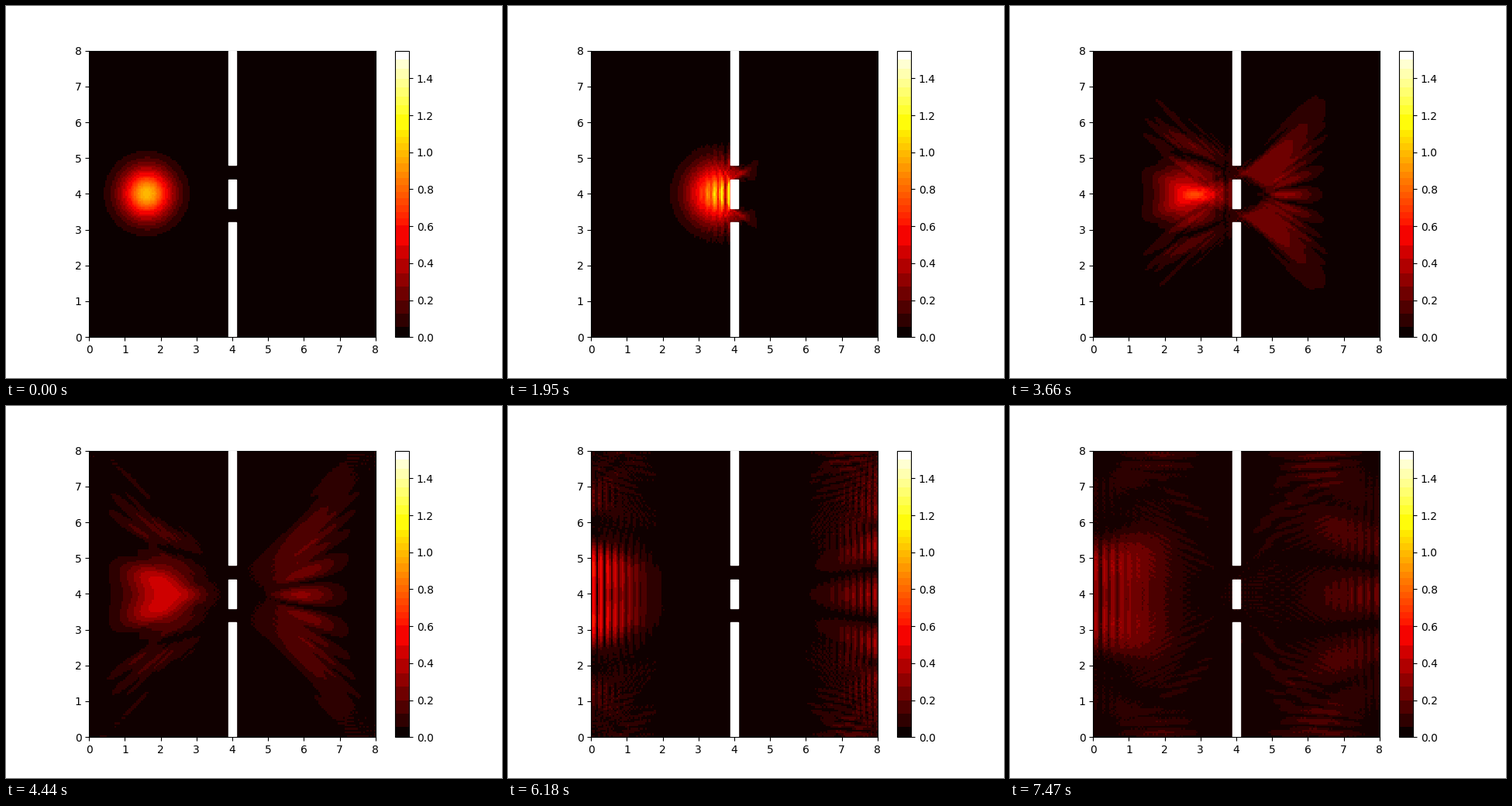
A matplotlib script that plays this animation: 640x480 px, repeating every 7.5 s.

```python
import numpy as np
import matplotlib.pyplot as plt
from matplotlib.animation import FuncAnimation
from matplotlib.cm import ScalarMappable
from matplotlib.colors import ListedColormap, Normalize
from matplotlib.patches import Rectangle

FRAMES, INTERVAL, STEPS_PER_FRAME = 250, 30, 2

# Domain and grid
L, D = 8.0, 0.05
DT = D**2 / 4
N = int(L / D) - 1

# Double slit: wall columns and the rows that close it
COL0, COL1 = 78, 82
WALL_ROWS = [(0, 64), (72, 88), (96, 160)]


def start_packet(x0=L / 5, y0=L / 2, sigma=0.5, k=15 * np.pi):
    axis = np.linspace(0, L, N)
    x, y = np.meshgrid(axis, axis)
    bell = np.exp(-((x - x0)**2 + (y - y0)**2) / (2 * sigma**2))
    return bell * np.exp(1j * k * (x - x0))


def simulate(steps):
    """Crank-Nicolson for a free particle in a box, done in the sine basis;
    the wave function is zeroed inside the walls after each step."""
    m = np.arange(1, N + 1)
    sine = np.sqrt(2 / (N + 1)) * np.sin(np.pi * np.outer(m, m) / (N + 1))
    sine = sine.astype(complex)
    energy = (2 - 2 * np.cos(np.pi * m / (N + 1))) / D**2
    half = 0.5j * DT * (energy[:, None] + energy[None, :])
    phase = (1 - half) / (1 + half)

    psi = start_packet()
    mods = [np.abs(psi)]
    for _ in range(steps - 1):
        psi = sine @ (phase * (sine @ psi @ sine)) @ sine
        for r0, r1 in WALL_ROWS:
            psi[r0:r1, COL0:COL1] = 0
        mods.append(np.abs(psi))
    return np.array(mods)


mods = simulate(FRAMES * STEPS_PER_FRAME)
vmax = mods.max()
shown = np.minimum(mods[::STEPS_PER_FRAME] / vmax * 256, 255).astype(int)

# Banded "hot" colours: shades sharing a coarse RGB cell take their mean
hot = plt.get_cmap("hot")(np.arange(256))[:, :3]
r, g, b = (hot * 255).astype(int).T
_, band = np.unique((r // 32) * 256 + (g // 16) * 8 + b // 32,
                    return_inverse=True)


def banded(index):
    weight = np.bincount(index.ravel(), minlength=256) * 5.4 + 27
    weight[255] += 150000  # white page
    total = np.bincount(band, weight)
    mean = [np.bincount(band, weight * c) / total for c in hot.T]
    return np.stack(mean, axis=1)[band]


fig = plt.figure(figsize=(6.4, 4.8), dpi=100)
ax = fig.add_subplot(xlim=(0, L), ylim=(0, L))
img = ax.imshow(banded(shown[0])[shown[0]], extent=[0, L, 0, L],
                interpolation="none", zorder=1)
scale = ScalarMappable(Normalize(0, vmax), ListedColormap(banded(shown[0])))
fig.colorbar(scale, ax=ax)

for r0, r1 in WALL_ROWS:
    ax.add_patch(Rectangle((COL0 * D, r0 * D), (COL1 - COL0) * D,
                           (r1 - r0) * D, color="w", zorder=50))


def update(i):
    img.set_data(banded(shown[i])[shown[i]])
    return [img]


anim = FuncAnimation(fig, update, frames=FRAMES, interval=INTERVAL,
                     repeat=True, repeat_delay=0, blit=False)
plt.show()
```
